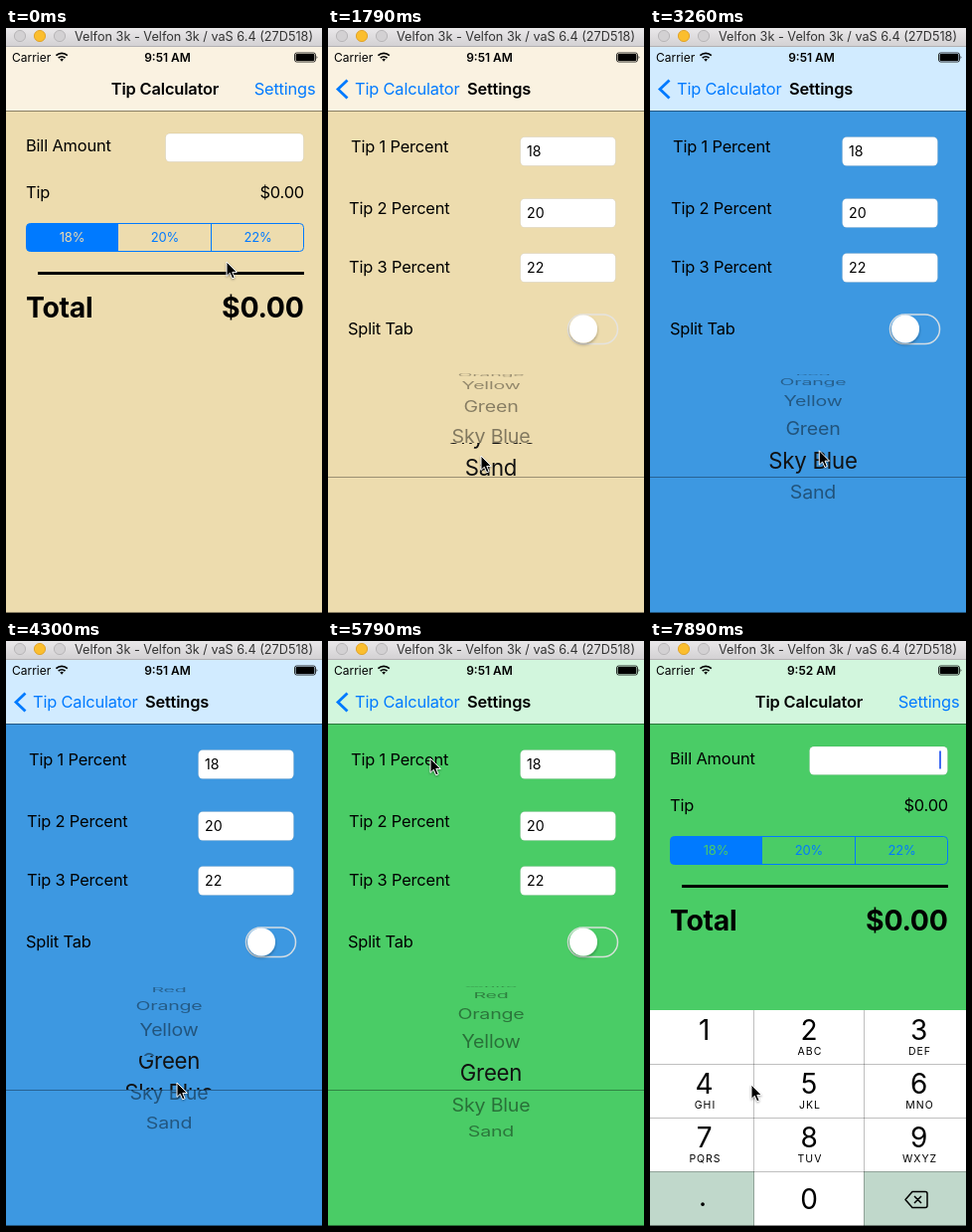
Recreate the animation shown at these times as an HTML page. Size 318 px wide and 588 px high, loop 8000 ms.

```html
<!DOCTYPE html>
<html lang="en">
<head>
<meta charset="utf-8">
<title>Tip Calculator</title>
<style>
  html, body { margin: 0; width: 100%; height: 100%; overflow: hidden; }
  svg { display: block; width: 100%; height: 100%; }
  text { font: 16.4px Inter, Roboto, sans-serif; letter-spacing: -.01em; white-space: pre; }
  .title { font-weight: 600; }
  .blue { fill: #007aff; }
  .mid { text-anchor: middle; }
  .end { text-anchor: end; }
  .big { font-size: 28.4px; font-weight: 700; }
  .seg { font-size: 13px; }
  .small { font-size: 12px; letter-spacing: 0; }
  .window { font-size: 12.7px; letter-spacing: 0; fill: #333; }
  .value { font-size: 14.2px; letter-spacing: 0; }
  .digit { font-size: 28px; }
  .letters { font-size: 10.5px; letter-spacing: 1px; }
  .faint { font-size: 19.6px; }
  .strong { font-size: 22.2px; fill: #111; }
</style>
</head>
<body>
<svg viewBox="0 0 318 588" xmlns="http://www.w3.org/2000/svg">
  <defs>
    <linearGradient id="chrome" x2="0" y2="1">
      <stop stop-color="#eae8ea"/><stop offset="1" stop-color="#d2d0d2"/>
    </linearGradient>
    <clipPath id="band"><rect y="417" width="318" height="34"/></clipPath>
    <clipPath id="outside"><path d="M0 345H318V417H0ZM0 451H318V525H0Z"/></clipPath>
    <filter id="soft" x="-50%" y="-50%" width="200%" height="200%">
      <feDropShadow dx="0" dy="2" stdDeviation="1.6" flood-opacity=".3"/>
    </filter>
  </defs>

  <g id="main">
    <rect class="bg" y="83" width="318" height="505"/>
    <text x="20" y="124">Bill Amount</text>
    <rect x="160.5" y="106" width="139" height="28.5" rx="4.5" fill="#fff" stroke="#000" stroke-opacity=".12" stroke-width=".6"/>
    <rect id="caret" x="291" y="110.5" width="2" height="18" fill="#426bf2"/>
    <text x="20" y="171">Tip</text>
    <text class="end" x="300" y="171">$0.00</text>
    <path d="M113 196.5H24.5a4 4 0 0 0-4 4v20a4 4 0 0 0 4 4H113Z" fill="#007aff"/>
    <rect x="20.5" y="196.5" width="279" height="28" rx="4" fill="none" stroke="#007aff"/>
    <path d="M206.5 196.5v28" stroke="#007aff"/>
    <text class="seg mid bg" x="66.5" y="215">18%</text>
    <text class="seg mid blue" x="160" y="215">20%</text>
    <text class="seg mid blue" x="253.5" y="215">22%</text>
    <path d="M32 246.5H300" stroke="#000" stroke-width="3"/>
    <text class="big" x="20" y="291">Total</text>
    <text class="big end" x="299.5" y="291">$0.00</text>
    <rect id="shade" y="83" width="318" height="505"/>
  </g>

  <g id="settings">
    <rect class="bg" y="83" width="318" height="505"/>
    <g id="fields"></g>
    <text x="20" y="308">Split Tab</text>
    <rect x="241.5" y="288" width="50" height="29.5" rx="14.7" fill="none" stroke="#e5e5e5" stroke-opacity=".9" stroke-width="1.5"/>
    <circle cx="257" cy="302.5" r="14" fill="#fff" filter="url(#soft)"/>
    <g id="faint" clip-path="url(#outside)"></g>
    <g id="strong" clip-path="url(#band)"></g>
    <path d="M0 451.5H318" stroke="#000" stroke-opacity=".35"/>
  </g>

  <g id="keyboard"></g>

  <rect id="bar" y="19" width="318" height="64"/>
  <path d="M0 83.5H318" stroke="#000" stroke-opacity=".42"/>
  <g id="mainNav">
    <text id="mainTitle" class="title mid" x="160" y="67">Tip Calculator</text>
    <text id="open" class="blue" x="311.5" y="67" text-anchor="end">Settings</text>
  </g>
  <g id="settingsNav">
    <g id="back">
      <path d="M19.5 52.5L10 61.5L19.5 70.5" fill="none" stroke="#007aff" stroke-width="2.8"/>
      <text class="blue" x="27" y="67">Tip Calculator</text>
    </g>
    <text class="title" x="140" y="67">Settings</text>
  </g>
  <text class="small" x="6" y="33.5">Carrier</text>
  <g fill="none" stroke="#000" stroke-width="1.7">
    <path d="M50.4 27.6a8.2 8.2 0 0 1 11.4 0M52.7 30.2a5 5 0 0 1 6.8 0"/>
    <path d="M54.3 31.6a2.7 2.7 0 0 1 3.6 0L56.1 33.8Z" fill="#000" stroke="none"/>
  </g>
  <text id="clock" class="small title mid" x="162.5" y="33.5"></text>
  <rect x="290.5" y="25" width="21" height="9" rx="2" fill="none" stroke="#000" stroke-width=".8"/>
  <rect x="291.6" y="26.1" width="18.8" height="6.8" rx="1"/>
  <path d="M312.6 27.8q1.6 1.7 0 3.4Z"/>

  <rect width="318" height="19" fill="url(#chrome)"/>
  <path d="M0 18.5H318" stroke="#b3b1b3"/>
  <g fill="#d3d1d3" stroke="#b5b3b5" stroke-width=".9">
    <circle cx="14" cy="8" r="5.6"/>
    <circle cx="34" cy="8" r="5.6" fill="#fbbe2e" stroke="#dfa023"/>
    <circle cx="54" cy="8" r="5.6"/>
  </g>
  <text class="window" x="69" y="13">Velfon 3k - Velfon 3k / vaS 6.4 (27D518)</text>
  <path d="M0 587.5H318" stroke="#000" stroke-opacity=".45"/>

  <path id="pointer" d="M0 0V14.4L3.3 11.3L5.7 16.8L8.1 15.8L5.8 10.4H10.3Z" stroke="#fff" stroke-width="1" stroke-linejoin="round"
    style="filter: drop-shadow(0 1px 1px rgba(0,0,0,.35))"/>
</svg>

<script>
const LOOP = 8000, TICK = 148.5;
const $ = id => document.getElementById(id);
const NS = 'http://www.w3.org/2000/svg';

function add(parent, tag, attrs, text = '') {
  const el = document.createElementNS(NS, tag);
  for (const name in attrs) el.setAttribute(name, attrs[name]);
  el.textContent = text;
  parent.appendChild(el);
  return el;
}

const set = (id, name, value) => $(id).setAttribute(name, value);
const shift = (id, x, y) => set(id, 'transform', `translate(${x} ${y})`);

// Linear track of [tick, ...values] keys.
function track(keys, k) {
  const i = keys.findIndex(key => key[0] > k);
  if (i < 0) return keys[keys.length - 1].slice(1);
  const a = keys[i - 1], b = keys[i], u = (k - a[0]) / (b[0] - a[0]);
  return a.slice(1).map((v, n) => v + (b[n + 1] - v) * u);
}

const pointerKeys = [
  [0, 222, 235], [5, 284, 64], [7, 284, 66], [8, 262, 120], [11, 154, 423],
  [12, 154, 430], [16, 156, 469], [20, 170, 424], [21, 170, 424], [25, 171, 427],
  [26, 171, 427], [29, 172, 444], [34, 168, 470], [39, 103, 118], [41, 28, 62],
  [44, 24, 62], [48, 181, 125], [50, 181, 125], [53, 102, 446]
];
const wheelKeys = [
  [0, 6], [11, 6], [12, 5.75], [16, 4.55], [17, 4.72], [18, 4.9], [20, 5], [21, 5],
  [25, 4.9], [26, 4.9], [29, 4.38], [34, 3.57], [35, 3.8], [36, 3.95], [37, 4]
];
const pageKeys = [
  [0, 0], [6, 0], [7, .3], [8, .78], [9, .96], [10, 1],
  [42, 1], [43, .85], [44, .4], [45, .1], [46, 0]
];
const keyboardKeys = [[0, 0], [49, 0], [50, .2], [51, .75], [52, .96], [53, 1]];

// [first tick, background, bar while changing, bar]
const themes = [
  [0, '#eddcae', '#faf2e1', '#faf2e1'],
  [16, '#3d98e1', '#c5e6ff', '#d1ebff'],
  [32, '#4acc66', '#c6f3d2', '#d2f6dd']
];

[[23, 109.5, 125, '18'], [21, 171.5, 187, '20'], [21, 226.5, 246, '22']].forEach(([x, top, y, value], i) => {
  const g = $('fields');
  add(g, 'text', { x, y }, `Tip ${i + 1} Percent`);
  add(g, 'rect', { x: 193.5, y: top, width: 96, height: 29, rx: 4.5, fill: '#fff', stroke: '#000', 'stroke-opacity': .12, 'stroke-width': .6 });
  add(g, 'text', { class: 'value', x: 200, y: top + 19.5 }, value);
});

const CENTER = 434, RADIUS = 86, ROW = 32, ANGLE = 21.8 * Math.PI / 180;
const rows = ['White', 'Red', 'Orange', 'Yellow', 'Green', 'Sky Blue', 'Sand'].map(name => ({
  faint: add($('faint'), 'text', { class: 'faint mid', y: 7.1 }, name),
  strong: add($('strong'), 'text', { class: 'strong mid', x: 164, y: 8.1 }, name)
}));

function drawWheel(pos) {
  rows.forEach(({ faint, strong }, i) => {
    const a = (i - pos) * ANGLE, c = Math.cos(a);
    const seen = Math.abs(a) < Math.PI / 2;
    faint.setAttribute('visibility', seen ? 'inherit' : 'hidden');
    faint.setAttribute('transform', `translate(164 ${CENTER + RADIUS * Math.sin(a)}) scale(1 ${Math.max(c, .01)})`);
    faint.setAttribute('opacity', .3 + .16 * c);
    strong.setAttribute('transform', `translate(0 ${CENTER + (i - pos) * ROW})`);
  });
}

function buildKeyboard() {
  const g = $('keyboard'), centers = [54.5, 160, 270.5];
  const letters = ['', 'ABC', 'DEF', 'GHI', 'JKL', 'MNO', 'PQRS', 'TUV', 'WXYZ'];
  add(g, 'rect', { y: 371, width: 318, height: 217, fill: '#fff' });
  add(g, 'path', { d: 'M0 533H105V588H0ZM215 533H318V588H215Z', fill: '#c0d8cb' });
  add(g, 'path', { d: 'M0 425.5H318M0 479.5H318M0 533.5H318M104.5 371V588M215.5 371V588', stroke: '#000', 'stroke-opacity': .25 });
  letters.forEach((word, i) => {
    const x = centers[i % 3], y = 401 + 54 * Math.floor(i / 3);
    add(g, 'text', { class: 'digit mid', x, y }, i + 1);
    add(g, 'text', { class: 'letters mid', x: x + 1, y: y + 15 }, word);
  });
  add(g, 'text', { class: 'digit mid', x: 160, y: 570.5 }, '0');
  add(g, 'text', { class: 'digit mid', x: 53, y: 568 }, '.');
  add(g, 'path', {
    d: 'M264 553.5H277a2 2 0 0 1 2 2V567.5a2 2 0 0 1-2 2H264L257 561.5ZM266 558l7 7M273 558l-7 7',
    fill: 'none', stroke: '#000', 'stroke-width': 1.5, 'stroke-linejoin': 'round'
  });
}

function draw(t) {
  const k = Math.floor((t + 8) / TICK);
  const [page] = track(pageKeys, k), [keys] = track(keyboardKeys, k);
  const [start, bg, changing, bar] = themes.filter(theme => theme[0] <= k).pop();

  document.querySelectorAll('.bg').forEach(el => el.setAttribute('fill', bg));
  set('bar', 'fill', k === start ? changing : bar);

  shift('main', -96 * page, 0);
  set('shade', 'opacity', .1 * page);
  shift('settings', 318 * (1 - page), 0);
  set('settings', 'visibility', page > 0 ? 'visible' : 'hidden');
  set('mainNav', 'opacity', 1 - page);
  shift('mainTitle', -80 * page, 0);
  set('open', 'opacity', k === 6 ? .3 : 1);
  set('settingsNav', 'opacity', page);
  shift('settingsNav', 80 * (1 - page), 0);
  set('back', 'opacity', k === 42 ? .3 : 1);

  drawWheel(track(wheelKeys, k)[0]);
  set('caret', 'visibility', k >= 50 ? 'visible' : 'hidden');
  set('keyboard', 'visibility', keys > 0 ? 'visible' : 'hidden');
  shift('keyboard', 0, 217 * (1 - keys));
  $('clock').textContent = k < 46 ? '9:51 AM' : '9:52 AM';
  shift('pointer', ...track(pointerKeys, k));
}

buildKeyboard();
const begin = performance.now();
function loop() {
  draw((performance.now() - begin) % LOOP);
  requestAnimationFrame(loop);
}
loop();
</script>
</body>
</html>
```
